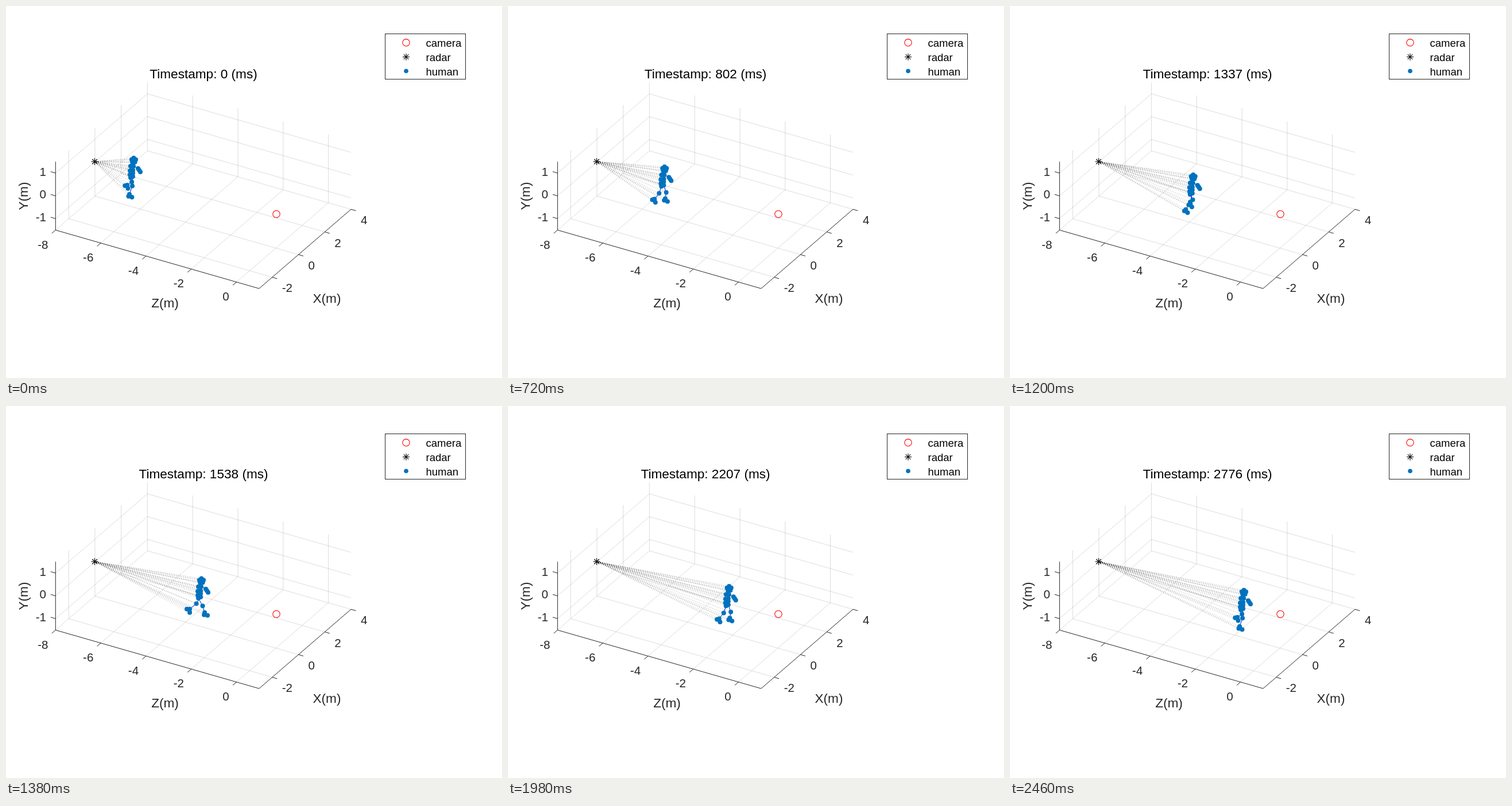
Animation of 864 by 648 pixels, one loop 2.49 s. Source, as an HTML page with a canvas:

```html
<!DOCTYPE html>
<html lang="en">
<head>
<meta charset="utf-8">
<title>Radar plot</title>
<style>
  html, body { margin: 0; width: 100%; height: 100%; overflow: hidden; background: #fff; }
  canvas { display: block; }
</style>
</head>
<body>
<canvas id="stage" width="864" height="648"></canvas>
<script>
const ctx = document.getElementById('stage').getContext('2d');
const FONT = '"Liberation Sans", Arial, sans-serif';
const INK = '#262626', DOT = '#0072bd';
const STEP = 30, FRAMES = 83;
const SAMPLE_MS = 33.447, DROPPED_SAMPLE = 74;
const RADAR = [154.5, 271], CAMERA = [471, 362.5];

// Key points of the walk: time in ms, x of the head.
const WALK = [[0, 222], [420, 249], [990, 296], [1650, 366], [2460, 407]];

// Resting joints, measured from the top of the head.
const BODY = {
  shoulderR: [-5, 14], shoulderL: [0, 14],
  chest: [-1, 21], navel: [-1, 26],
  hipR: [-5, 34], hipL: [-1, 32],
  elbowL: [8, 18], wristL: [10, 21], handL: [12, 24],
  elbowR: [-6, 22], wristR: [-6, 29], handR: [-4, 32]
};

const CHAINS = [
  'neck shoulderL chest navel hipL kneeL ankleL heelL',
  'navel hipR kneeR ankleR heelR',
  'ankleL toeL', 'ankleR toeR',
  'shoulderL elbowL wristL handL',
  'shoulderL shoulderR elbowR wristR handR'
].map(chain => chain.split(' '));

const mix = (a, b, k) => a + (b - a) * k;
const add = (a, b) => [a[0] + b[0], a[1] + b[1]];

// Smooth curve through the points that never overshoots them.
function curve(points, t) {
  const last = points.length - 1;
  const slope = j => (points[j + 1][1] - points[j][1]) / (points[j + 1][0] - points[j][0]);
  const tangent = j => {
    if (j === 0) return slope(0);
    if (j === last) return slope(last - 1);
    const a = slope(j - 1), b = slope(j);
    return a * b <= 0 ? 0 : 2 * a * b / (a + b);
  };
  let i = 0;
  while (i < last - 1 && t >= points[i + 1][0]) i++;
  const [t0, p] = points[i], [t1, q] = points[i + 1];
  const span = t1 - t0, u = (t - t0) / span, d = q - p;
  const m = tangent(i) * span, n = tangent(i + 1) * span;
  return p + u * (m + u * (3 * d - 2 * m - n + u * (m + n - 2 * d)));
}

// Steps taken since the widest stride; the pace slows a little.
function stepCount(ms) {
  const s = (ms - 1380) / 1000;
  return 1.574 * s - 0.172 * s * s;
}

function addLeg(joints, side, head, swinging, f) {
  const arc = Math.sin(Math.PI * f);
  const reach = swinging ? -20 + 26 * f ** 1.5 : 6 - 26 * f;
  const drop = swinging ? 53 + 6 * f - 9 * arc : 59 - 6 * f + 7 * arc;
  const roll = swinging ? 1 - f * f : f ** 3;
  const hip = joints['hip' + side], ankle = add(head, [reach, drop]);
  joints['knee' + side] = [
    mix(hip[0], ankle[0], .5) + 2 + (swinging ? 3 * arc : 0),
    mix(hip[1], ankle[1], .5) + 1
  ];
  joints['ankle' + side] = ankle;
  joints['heel' + side] = add(ankle, [mix(-1, -5, roll), mix(4, 0, roll)]);
  joints['toe' + side] = add(ankle, [mix(5, 0, roll), mix(5, 6, roll)]);
}

function pose(ms) {
  const x = curve(WALK, ms);
  const head = [x, 265 + .303 * (x - 222)];
  const joints = { neck: add(head, [-1, 8]) };
  for (let i = 0; i < 5; i++) {
    const a = (i * 72 - 90) * Math.PI / 180;
    joints['skull' + i] = add(head, [.4 + 3.8 * Math.cos(a), 3.6 + 3.8 * Math.sin(a)]);
  }
  for (const name in BODY) joints[name] = add(head, BODY[name]);
  const steps = stepCount(ms), whole = Math.floor(steps);
  const leftSwings = whole % 2 === 0;
  addLeg(joints, 'L', head, leftSwings, steps - whole);
  addLeg(joints, 'R', head, !leftSwings, steps - whole);
  return joints;
}

// Plot metres to stage pixels.
const project = (x, y, z) => [
  86.3 + (z + 8) * 39.4 + (x + 3) * 22.87,
  390.3 + (z + 8) * 11.32 - (x + 3) * 19.72 - (y + 1.5) * 39.7
];

function line(a, b, color, width = 1) {
  ctx.strokeStyle = color;
  ctx.lineWidth = width;
  ctx.beginPath();
  ctx.moveTo(...a);
  ctx.lineTo(...b);
  ctx.stroke();
}

function text(str, x, y, size, align = 'left', color = INK) {
  ctx.font = `${size}px ${FONT}`;
  ctx.textAlign = align;
  ctx.fillStyle = color;
  ctx.fillText(str, x, y);
}

function dot([x, y], r = 4) {
  ctx.fillStyle = DOT;
  ctx.beginPath();
  ctx.arc(x, y, r, 0, Math.PI * 2);
  ctx.fill();
}

function ring([x, y]) {
  ctx.strokeStyle = '#f00';
  ctx.lineWidth = 1.1;
  ctx.beginPath();
  ctx.arc(x, y, 6.2, 0, Math.PI * 2);
  ctx.stroke();
}

function star([x, y]) {
  for (let i = 0; i < 4; i++) {
    const a = i * Math.PI / 4, dx = 6 * Math.cos(a), dy = 6 * Math.sin(a);
    line([x - dx, y - dy], [x + dx, y + dy], '#000', 1.1);
  }
}

function drawAxes() {
  const grid = (a, b) => line(project(...a), project(...b), 'rgba(38,38,38,.16)');
  for (let z = -8; z <= 0; z += 2) {
    const base = project(-3, -1.5, z);
    grid([-3, -1.5, z], [4, -1.5, z]);
    grid([4, -1.5, z], [4, 1.5, z]);
    line(base, add(base, [-6.5, 5.6]), INK);
    text(z, base[0] - 12.8, base[1] + 32.2, 20.5, 'right');
  }
  for (let x = -2; x <= 4; x += 2) {
    const base = project(x, -1.5, 1);
    grid([x, -1.5, -8], [x, -1.5, 1]);
    if (x < 4) grid([x, -1.5, -8], [x, 1.5, -8]);
    line(base, add(base, [8.5, 2.5]), INK);
    text(x, base[0] + 17, base[1] + 26, 20.5);
  }
  for (let y = -1; y <= 1; y++) {
    const base = project(-3, y, -8);
    grid([-3, y, -8], [4, y, -8]);
    grid([4, y, -8], [4, y, 1]);
    line(base, add(base, [-8.5, -2.5]), INK);
    text(y, 70, base[1] + 4.7, 20.5, 'right');
  }

  const left = project(-3, -1.5, -8), front = project(-3, -1.5, 1);
  line(left, project(-3, 1.5, -8), INK);
  line(left, front, INK);
  line(front, project(4, -1.5, 1), INK);

  text('Z(m)', 277, 525, 22.6, 'center');
  text('X(m)', 559, 516.5, 22.6, 'center');
  ctx.save();
  ctx.translate(38, 331);
  ctx.rotate(-Math.PI / 2);
  text('Y(m)', 0, 0, 22.6, 'center');
  ctx.restore();
}

function drawLegend() {
  ctx.strokeStyle = INK;
  ctx.lineWidth = 1;
  ctx.strokeRect(660.5, 48.5, 140, 79);
  ring([697, 63.8]);
  star([697, 88.7]);
  dot([697, 113.2], 3.8);
  ['camera', 'radar', 'human'].forEach((name, i) =>
    text(name, 731.5, 71.3 + 24.8 * i, 18.5, 'left', '#000'));
}

function drawHuman(joints) {
  const points = Object.values(joints);
  ctx.setLineDash([1, 2.2]);
  for (const p of points) line(RADAR, p, 'rgba(0,0,0,.42)', .8);
  ctx.setLineDash([]);
  for (const chain of CHAINS) {
    for (let i = 1; i < chain.length; i++) line(joints[chain[i - 1]], joints[chain[i]], '#00f');
  }
  points.forEach(p => dot(p));
}

function draw(frame) {
  ctx.fillStyle = '#fff';
  ctx.fillRect(0, 0, 864, 648);
  drawAxes();
  drawHuman(pose(frame * STEP));
  ring(CAMERA);
  star(RADAR);
  drawLegend();
  const sample = frame < DROPPED_SAMPLE ? frame : frame + 1;
  text(`Timestamp: ${Math.floor(sample * SAMPLE_MS)} (ms)`, 344, 125.5, 22.6, 'center', '#000');
}

const start = performance.now();
function tick() {
  const elapsed = Math.max(0, performance.now() - start);
  draw(Math.floor(elapsed / STEP) % FRAMES);
  requestAnimationFrame(tick);
}
tick();
</script>
</body>
</html>
```
